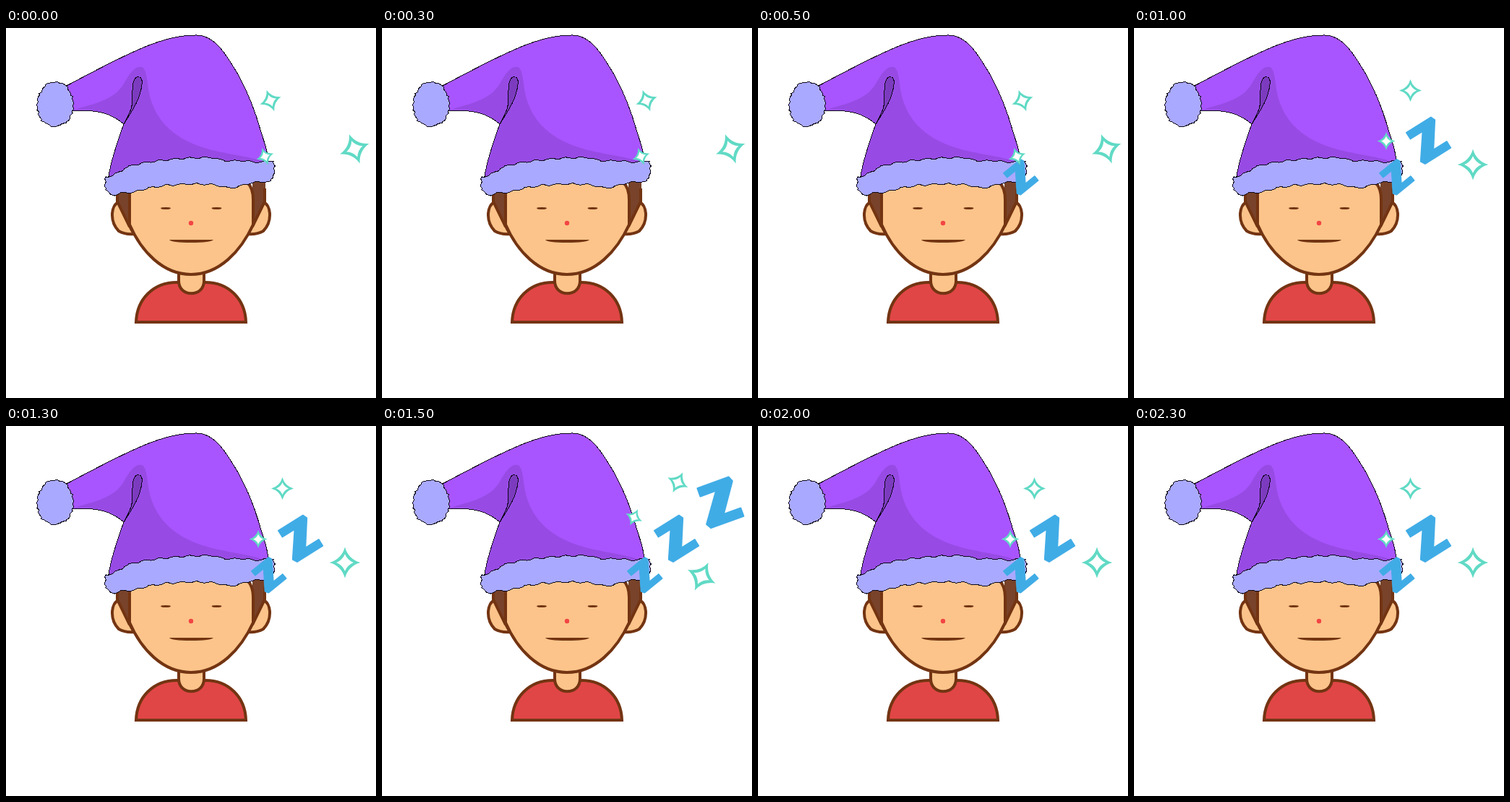
These frames come from a looping animation (512 by 512 pixels, 2500 ms). An HTML page:

```html
<!DOCTYPE html>
<html lang="en">
<head>
<meta charset="utf-8">
<title>Sleeping in a nightcap</title>
<style>
  html, body { margin: 0; width: 100%; height: 100%; overflow: hidden; background: #fff; }
  svg { display: block; width: 100vw; height: 100vh; }
  .skin { fill: #fcc48a; }
  .line { stroke: #733412; stroke-width: 4; }
  .thin { stroke: #0c0618; shape-rendering: crispEdges; }
  .fur { fill: #a9a9ff; }
  .zed { fill: #40ace6; stroke: #40ace6; stroke-width: 2; stroke-linejoin: round; }
</style>
</head>
<body>
<svg viewBox="0 0 512 512">
  <defs>
    <g id="side">
      <path class="skin line" d="M156 241C145 245 143 268 156 281Q165 286 177 285L171 274Z"/>
      <path fill="#78432a" d="M153 210H171V275L153 240Z"/>
      <path class="line" fill="none" d="M154 222V240L171 275"/>
    </g>
    <g id="star">
      <path fill="#60dac5" d="M0-1Q.22-.22 1 0Q.22.22 0 1Q-.22.22-1 0Q-.22-.22 0-1Z"/>
      <path fill="#fff" d="M0-.55Q.16-.16.55 0Q.16.16 0 .55Q-.16.16-.55 0Q-.16-.16 0-.55Z"/>
    </g>
    <path id="zed" d="M-22-29H24L27-22L0 17H25V29H-23L-27 22L1-17H-22Z"/>
  </defs>

  <path class="line" fill="#e04646" d="M180 407H332C331 375 308 352 276 352H236C204 352 181 375 180 407Z"/>
  <path class="skin line" d="M239 330V350C239 373 274 373 274 350V330"/>
  <use href="#side"/>
  <use href="#side" transform="translate(512) scale(-1 1)"/>
  <path class="skin line" d="M171 210V272C187 309 217 341 256 341S325 309 342 272V238Q342 221 334 214"/>
  <g fill="#733412">
    <ellipse cx="221" cy="249.5" rx="7" ry="1.6"/>
    <ellipse cx="291.5" cy="249.5" rx="7" ry="1.6"/>
    <path d="M226 293H287Q283 297 256 297T226 293Z"/>
  </g>
  <circle cx="256" cy="270" r="3.2" fill="#f24545"/>

  <path id="hat" class="thin" fill="#a855ff" d="M80 82C112 65 149 45 181 31C205 20 235 10 262 10C289 9 305 37 322 66C337 93 346 119 353 144C358 160 363 172 363 190L142 205C146 180 155 155 163 133C147 119 127 112 92 115Z"/>
  <path fill="#974be4" d="M93 114C112 106 148 103 163 77C172 60 180 52 188 54C197 59 194 79 201 101C212 135 241 158 285 169C315 176 345 179 362 187V190L143 205C147 180 156 155 164 133C148 118 127 111 93 114Z"/>
  <path class="thin" fill="#7c3bbf" d="M163 133C171 120 186 100 188 78C189 69 186 67 181 68C174 71 175 87 175 96C176 106 173 115 163 133Z"/>
  <path class="fur thin frayed" d="M69 74C83 74 94 92 93 110C92 125 81 136 67 136C52 136 43 121 43 108C43 90 55 74 69 74Z"/>
  <path class="fur thin frayed" d="M138 206Q152 204 163 195Q180 185 250 180L286 179Q300 186 328 183Q345 188 369 183Q375 197 366 213Q350 212 332 216Q318 222 305 221Q290 215 250 216Q200 218 175 228Q165 226 152 231Q138 231 137 218Z"/>

  <use class="zed" href="#zed" transform="translate(363 206.5) rotate(-39) scale(.66)"/>
  <use class="zed" href="#zed" transform="translate(406.5 156) rotate(-32) scale(.87)"/>
  <use class="zed" href="#zed" transform="translate(467 106) rotate(-20)"/>
  <g id="stars">
    <use href="#star" transform="translate(382.5 86.5) scale(15.5)"/>
    <use href="#star" transform="translate(349 156.5) scale(12.5)"/>
    <use href="#star" transform="translate(469 189) scale(21.5)"/>
  </g>
</svg>
<script>
  const stars = document.getElementById('stars');
  const zeds = document.querySelectorAll('.zed');
  const tilts = [-20, -20, 0, 26]; // by number of visible letters

  // Give a smooth outline a furry edge
  function fray(path) {
    const length = path.getTotalLength();
    const points = [];
    for (let at = 0; at < length; at += 3) {
      const { x, y } = path.getPointAtLength(at);
      const k = points.length;
      points.push(`${x + 1.1 * Math.sin(k * 2.4)} ${y + 1.1 * Math.sin(k * 0.9)}`);
    }
    path.setAttribute('d', `M${points.join('L')}Z`);
  }

  function draw(now) {
    const step = Math.floor(now / 500) % 5;
    const count = 3 - Math.abs(3 - step);
    zeds.forEach((z, i) => z.setAttribute('visibility', i < count ? 'visible' : 'hidden'));
    stars.setAttribute('transform', `rotate(${tilts[count]} 414 140.5)`);
    requestAnimationFrame(draw);
  }

  document.querySelectorAll('.frayed').forEach(fray);
  draw(performance.now());
</script>
</body>
</html>
```
